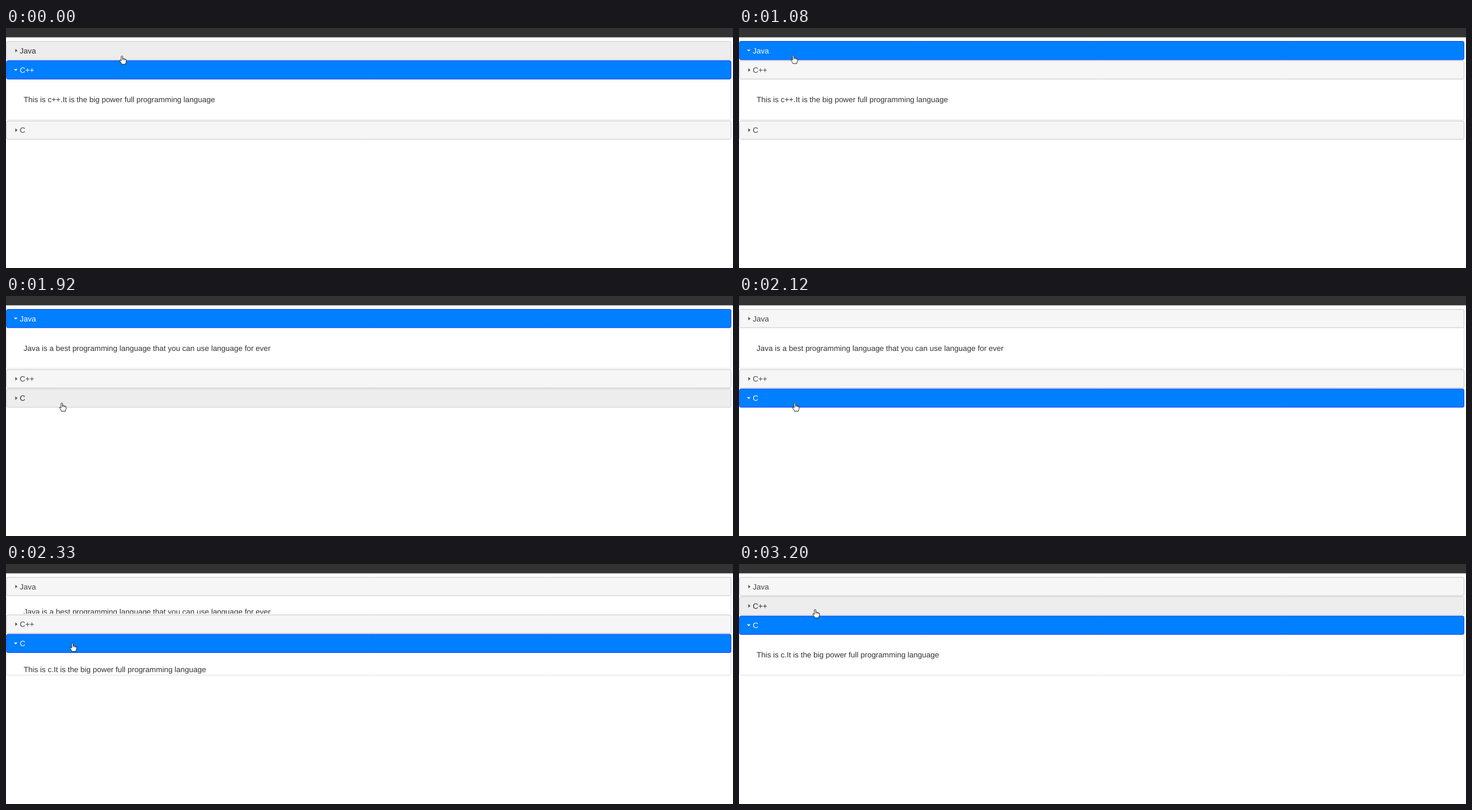
An HTML page with a canvas that plays this animation: 1280x424 px, repeating every 3330 ms.

```html
<!DOCTYPE html>
<html lang="en">
<head>
<meta charset="utf-8">
<title>Accordion</title>
<style>
  html, body { margin: 0; width: 100%; height: 100%; overflow: hidden; background: #fff; }
  canvas { display: block; }
</style>
</head>
<body>
<canvas id="stage" width="1280" height="424"></canvas>
<script>
const ctx = document.getElementById('stage').getContext('2d');
const LOOP = 3330, LEFT = 0.8, WIDTH = 1275.7;
const TOP = 23.6, HEAD = 32.4, PITCH = 34.2, PANEL = 72.2, PAD = 14.2;

const sections = [
  ['Java', 'Java is a best programming language that you can use language for ever'],
  ['C++', 'This is c++.It is the big power full programming language'],
  ['C', 'This is c.It is the big power full programming language'],
];

// Screen updates: start, end, interval
const runs = [[0, 0, 1], [70, 550, 80], [1080, 1570, 70], [2120, 2400, 70], [2580, 3140, 70], [3200, 3200, 1]];

// Pointer path: time, x, y
const path = [
  [0, 204.2, 49], [550, 95.5, 47.8], [1150, 95.5, 47.8], [1360, 97, 154],
  [1500, 98.3, 188.5], [2120, 98.3, 188.5], [2330, 116.7, 139.5], [2400, 119, 128],
  [2510, 119, 128], [3070, 134, 84], [3200, 134, 80], [LOOP, 134, 80],
];

const hand = new Path2D('M-1.3 1.2Q0-.8 1.3 1.2V5Q3.2 4.3 3.7 5.6Q5.2 5 5.8 6.3Q7.6 6 7.6 8V10Q7.4 12 6.4 13.4V15H-.6Q-1 13.4-2.4 11.6L-4.2 8.9Q-4.2 7-2.4 8L-1.3 9.2Z');
const knuckles = new Path2D('M1.3 5V7.6M3.7 5.6V7.8M5.8 6.3V8');
const arrow = new Path2D('M0 0V10.6L2.4 8.4L4 12L5.6 11.3L4 7.8H7.2Z');

function snap(t) {
  const [start, end, step] = runs.filter(r => r[0] <= t).pop();
  return Math.min(end, start + Math.floor((t - start) / step) * step);
}

function pointerAt(t) {
  const i = path.findIndex(p => p[0] > t);
  const [t0, x0, y0] = path[i - 1], [t1, x1, y1] = path[i];
  const k = (t - t0) / (t1 - t0);
  return { x: x0 + (x1 - x0) * k, y: y0 + (y1 - y0) * k };
}

function swing(t, start) {
  const k = Math.max(0, Math.min(1, (t - start) / 400));
  return 0.5 - Math.cos(Math.PI * k) / 2;
}

// Open fraction of each panel and the active section
function accordionAt(t) {
  if (t < 1080) return { active: 1, open: [0, 1, 0] };
  if (t < 2120) {
    const p = swing(t, 1075);
    return { active: 0, open: [p, 1 - p, 0] };
  }
  const p = t < 2400 ? swing(t, 2116) : 1;
  return { active: 2, open: [1 - p, 0, p] };
}

function shape(points, color) {
  ctx.fillStyle = color;
  ctx.beginPath();
  points.forEach(([x, y]) => ctx.lineTo(x, y));
  ctx.fill();
}

function drawHeader(label, y, active, hover) {
  const [fill, line, ink, icon] = active ? ['#007fff', '#003eff', '#fff', '#fff']
    : hover ? ['#ededed', '#ccc', '#2b2b2b', '#555']
    : ['#f6f6f6', '#c5c5c5', '#454545', '#555'];
  ctx.beginPath();
  ctx.roundRect(LEFT, y, WIDTH, HEAD, 2.5);
  ctx.fillStyle = fill;
  ctx.fill();
  ctx.strokeStyle = line;
  ctx.stroke();
  const mid = y + 16.3;
  shape(active ? [[13.9, mid - 1.7], [20.3, mid - 1.7], [17.1, mid + 1.6]]
    : [[16.4, mid - 3.2], [20.2, mid], [16.4, mid + 3.2]], icon);
  ctx.fillStyle = ink;
  ctx.fillText(label, 24.3, y + 21);
}

function drawPanel(text, headY, open, closing) {
  const y = headY + HEAD, h = PANEL * open - 0.3;
  if (h < 1) return;
  ctx.save();
  ctx.beginPath();
  ctx.rect(0, y, 1280, h + (closing ? 0 : 0.6));
  ctx.clip();
  ctx.strokeStyle = '#ddd';
  ctx.beginPath();
  ctx.roundRect(LEFT, y - 5, WIDTH, h + 5 + (closing ? 5 : 0), 2.5);
  ctx.stroke();
  ctx.fillStyle = '#333';
  ctx.fillText(text, 31, headY + 73 - PAD * (1 - open));
  ctx.restore();
}

function drawPointer({ x, y }, isHand) {
  ctx.save();
  ctx.translate(x, y);
  ctx.fillStyle = '#fff';
  ctx.strokeStyle = '#111';
  ctx.lineWidth = 0.9;
  ctx.fill(isHand ? hand : arrow);
  ctx.stroke(isHand ? hand : arrow);
  if (isHand) ctx.stroke(knuckles);
  ctx.restore();
}

function draw(now) {
  const t = snap(now % LOOP);
  const { active, open } = accordionAt(t);
  const pointer = pointerAt(t);
  let isHand = false, y = TOP;

  ctx.fillStyle = '#fff';
  ctx.fillRect(0, 0, 1280, 424);
  ctx.fillStyle = '#333';
  ctx.fillRect(0, 0, 1280, 16.5);
  ctx.font = '13.45px "Liberation Sans", Arial, sans-serif';
  ctx.textRendering = 'geometricPrecision';
  ctx.lineWidth = 1;

  sections.forEach(([label, text], i) => {
    const over = slack => pointer.y > y - slack && pointer.y < y + HEAD + slack;
    isHand ||= over(0);
    drawPanel(text, y, open[i], i !== active && open[i] < 0.99);
    drawHeader(label, y, i === active, over(6)); // hover lags slightly behind the pointer
    y += PITCH + PANEL * open[i];
  });
  drawPointer(pointer, isHand);
  requestAnimationFrame(tick);
}

const began = performance.now();
function tick() { draw(performance.now() - began); }
tick();
</script>
</body>
</html>
```
